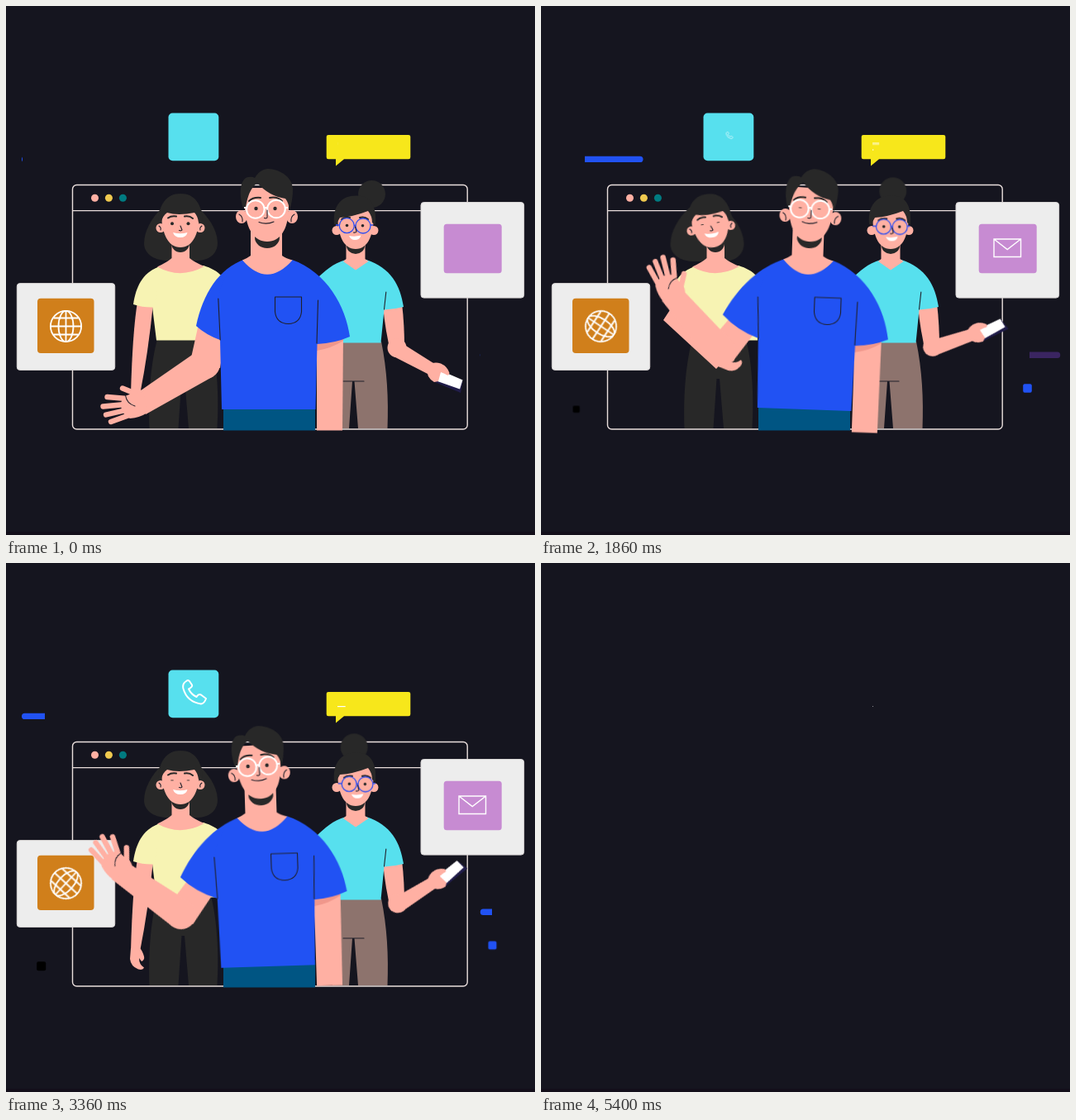
Recreate the animation shown at these times as an HTML page without scripts. Size 640 by 640 pixels, loop 5430 ms.

```html
<!DOCTYPE html>
<html lang="en">
<head>
<meta charset="utf-8">
<title>Team wave</title>
<style>
html, body { margin: 0; width: 100%; height: 100%; overflow: hidden; background: #15151f; }
svg { display: block; width: 100vw; height: 100vh; }
:root { --loop: 5.43s; --half: 2.715s; --third: 1.81s; --quarter: 1.3575s; --fifth: 1.086s; --sine: cubic-bezier(.37,0,.63,1); }

.skin { fill: #ffb0a3; }
.dark { fill: #282828; }
.blue { fill: #2152f3; }
.cyan { fill: #57e0ee; }
.cream { fill: #f7f3b3; }
.line { fill: none; stroke: #20202a; stroke-width: 1.1; stroke-linecap: round; stroke-linejoin: round; }
.brow { fill: none; stroke: #282828; stroke-width: 2; stroke-linecap: round; }
.white { fill: none; stroke: #fff; }

.scene { animation: cut var(--loop) step-end infinite; }
@keyframes cut { 0% { opacity: 1; } 99.43% { opacity: 0; } }

/* man */
.body, .head, .upper, .fore, .sleeve { animation: var(--loop) var(--sine) infinite; }
.body { transform-origin: 318px 510px; animation-name: sway; }
.head { transform-origin: 316px 295px; animation-name: nod; }
.upper { transform-origin: 252px 370px; animation-name: lift; }
.fore { transform-origin: 241px 433px; animation-name: wave; }
.sleeve { animation-name: sleeve; }
@keyframes sway {
  0%, 89.3%, 100% { transform: rotate(0deg); }
  16%, 34.3%, 52.9%, 71.3% { transform: rotate(2.05deg); }
  25%, 43.5%, 61.9% { transform: rotate(-1.8deg); }
}
@keyframes nod {
  0%, 89.3%, 100% { transform: rotate(0deg); }
  16%, 34.3%, 52.9%, 71.3% { transform: rotate(1.9deg); }
  25%, 43.5%, 61.9% { transform: rotate(-1.7deg); }
}
@keyframes lift {
  0%, 89.3%, 100% { transform: rotate(0deg); }
  16%, 71.3% { transform: rotate(26deg); }
}
@keyframes wave {
  0%, 89.3%, 100% { transform: rotate(0deg); }
  16%, 34.3%, 52.9%, 71.3% { transform: rotate(53deg); }
  25%, 43.5%, 61.9% { transform: rotate(43deg); }
}
@keyframes sleeve {
  0%, 89.3%, 100% { d: path("M288 307C258 317 238 348 230 387Q242 398 259 404L280 360Z"); }
  16%, 71.3% { d: path("M288 307C258 317 232 343 215 377Q234 396 259 404L280 360Z"); }
}
.blink { transform-origin: 316px 245px; animation: blink var(--half) linear infinite; }
@keyframes blink {
  0%, 59%, 73%, 100% { transform: scaleY(1); }
  61%, 69.5% { transform: scaleY(.25); }
}

/* woman on the left */
.tilt, .locks, .hang, .palm { animation: var(--half) var(--sine) infinite; }
.tilt { transform-origin: 211px 292px; animation-name: tilt; }
.locks { animation-name: locks; }
.hang { animation-name: hang; }
.palm { transform-origin: 156px 468px; animation-name: palm; }
@keyframes tilt {
  0%, 34%, 96%, 100% { transform: none; }
  56%, 73% { transform: translate(-2px, 0) rotate(-8deg); }
}
@keyframes locks {
  0%, 34%, 96%, 100% { transform: none; }
  56%, 73% { transform: translate(-10.5px, 1px); }
}
@keyframes hang {
  0%, 34%, 96%, 100% { d: path("M159 358Q153 395 151 470L162 470Q172 420 178 360Z"); }
  56%, 73% { d: path("M163 358Q159 363 148 380L212 439L224 426Q180 385 177 360Z"); }
}
@keyframes palm {
  0%, 34%, 96%, 100% { transform: none; }
  56%, 73% { transform: translate(62px, -36px) rotate(-72deg); }
}
.wink { transform-origin: 211px 263px; animation: wink var(--quarter) linear infinite; }
@keyframes wink {
  0%, 31%, 56%, 100% { transform: scaleY(1); }
  34%, 52% { transform: scaleY(.25); }
}

/* woman on the right */
.bun, .look, .phone { animation: var(--half) var(--sine) infinite; }
.bun { animation-name: bun; }
.look { animation-name: look; }
.phone { transform-origin: 472px 412px; animation-name: phone; }
@keyframes bun {
  0%, 7.4%, 83.2%, 100% { transform: none; }
  33.1%, 55.9% { transform: translate(-30px, -6.5px); }
}
@keyframes look {
  0%, 7.4%, 83.2%, 100% { transform: none; }
  33.1%, 55.9% { transform: translate(4px, 2.4px); }
}
@keyframes phone {
  0%, 7.4%, 83.2%, 100% { transform: rotate(0deg); }
  33.1%, 55.9% { transform: rotate(-87deg); }
}

/* floating parts */
.globe { transform-origin: 72.5px 387.5px; animation: spin var(--loop) linear infinite; }
@keyframes spin { to { transform: rotate(360deg); } }
.call { transform-origin: 228px 156.5px; animation: call var(--half) var(--sine) infinite; }
@keyframes call {
  0%, 81%, 100% { transform: scale(0); }
  22%, 47% { transform: scale(1); }
}
.mail { transform-origin: 564px 293px; animation: mail var(--half) var(--sine) infinite; }
@keyframes mail {
  0%, 5%, 96%, 100% { transform: scale(0); }
  22%, 75% { transform: scale(1); }
}
.row { transform-origin: 401px 170px; animation: var(--third) linear infinite; }
.r1 { animation-name: row1; }
.r2 { animation-name: row2; }
@keyframes row1 {
  0% { transform: scaleX(0); animation-timing-function: cubic-bezier(.2,.4,.6,1); }
  44% { transform: scaleX(1); animation-timing-function: cubic-bezier(.37,0,.63,1); }
  83%, 100% { transform: scaleX(0); }
}
@keyframes row2 {
  0%, 100% { transform: scaleX(0); }
  55%, 58% { transform: scaleX(1); }
}
.bar { fill: #2152f3; animation: bar var(--fifth) infinite, var(--fifth) linear infinite; }
.b1 { animation-name: bar, hue1; }
.b2 { animation-name: bar, hue2; }
@keyframes bar {
  0% { clip-path: inset(0 100% 0 0); animation-timing-function: cubic-bezier(.25,.3,.6,1); }
  50% { clip-path: inset(0 0 0 0); animation-timing-function: cubic-bezier(.6,0,.4,1); }
  100% { clip-path: inset(0 0 0 100%); }
}
@keyframes hue1 { 0%, 71.5% { fill: #2152f3; } 78%, 100% { fill: #3a2561; } }
@keyframes hue2 { 0%, 10% { fill: #2152f3; } 28%, 100% { fill: #3a2561; } }
.p1 { transform-origin: 588.5px 462.5px; animation: pulse1 var(--quarter) linear infinite; }
.p2 { transform-origin: 42.7px 487.8px; animation: pulse2 var(--quarter) linear infinite; }
@keyframes pulse1 {
  0%, 100% { transform: scale(0); }
  18%, 38% { transform: scale(1); }
  60% { transform: scale(.87); }
}
@keyframes pulse2 {
  0%, 8%, 100% { transform: scale(0); }
  47%, 62% { transform: scale(1); }
}
</style>
</head>
<body>
<svg viewBox="0 0 640 640">
<rect width="640" height="640" fill="#15151f"/>
<rect y="636" width="640" height="4" fill="#130f1a"/>
<rect x="401" y="173" width="1" height="1" fill="#8c8c90"/>

<g class="scene">
  <g fill="none" stroke="#eadfdd" stroke-width="1.4">
    <rect x="80.5" y="216.5" width="477.7" height="295.5" rx="5"/>
    <path d="M80.5 247.6H558"/>
  </g>
  <circle cx="107.5" cy="232.3" r="4.5" fill="#ffb0a3"/>
  <circle cx="124.4" cy="232.3" r="4.5" fill="#efc94f"/>
  <circle cx="141.4" cy="232.3" r="4.5" fill="#007a80"/>

  <g stroke="#d9d6d6" fill="#ededed">
    <rect x="13.3" y="335.6" width="118.4" height="104.8" rx="3.5"/>
    <rect x="502" y="237.5" width="124.6" height="115.6" rx="3.5"/>
  </g>
  <rect x="38" y="353.7" width="68.5" height="66.3" rx="4" fill="#d07f1b"/>
  <g class="globe white" stroke-width="1.8">
    <circle cx="72.5" cy="387.5" r="18.6"/>
    <ellipse cx="72.5" cy="387.5" rx="9" ry="18.6"/>
    <path d="M72.5 369V406M54 387.5H91M57.5 377.5H87.500M57.500 397.500H87.500"/>
  </g>
  <rect x="529.7" y="263.8" width="70" height="59.400" rx="3.500" fill="#c78bd2"/>
  <path class="mail white" stroke-width="1.4" d="M548 282H580.500V303.500H548ZL564.200 294.500L580.500 282"/>

  <rect class="cyan" x="196.500" y="129.500" width="60.800" height="57.700" rx="5"/>
  <path class="call white" stroke-width="2" stroke-linejoin="round" d="M218 143Q213 146 214.500 152Q219 168 236 170.500Q240 170 242 164L236 159.500Q233 158 230.500 162Q224 159 221 152.500Q226 150 225 147.500L222 143Q220 141 218 143Z"/>
  <path fill="#f7e71b" d="M390 156H487Q489.300 156 489.300 158V183Q489.300 185.300 487 185.300H409L399 193.500V185.300H390Q387.700 185.300 387.700 183V158Q387.700 156 390 156Z"/>
  <rect class="row r1" x="401" y="165.800" width="68.500" height="1.500" fill="#fff"/>
  <rect class="row r2" x="401" y="173" width="29" height="1.200" fill="#fff"/>

  <rect class="bar b1" x="19" y="181.700" width="104.500" height="7.400" rx="3.700"/>
  <rect class="bar b2" x="573.800" y="418.600" width="54.400" height="7.400" rx="3.500"/>
  <rect class="p1 blue" x="583.200" y="457.200" width="10.600" height="10.600" rx="2"/>
  <rect class="p2" x="37.200" y="482.300" width="11" height="11" rx="2" fill="#000"/>

  <!-- left -->
  <g>
    <path class="locks dark" d="M190 243C176 256 167 272 167 288C168 302 182 308 195 308H230C246 308 256 300 256 286C255 268 244 255 232 243Z"/>
    <path class="dark" d="M183 403C176 430 172 465 173.500 511H208.500L212.500 451H216L221 511H255.500C258 470 255 430 248 403Z"/>
    <path class="cream" d="M184 316C168 322 172 345 177 364L182 404.500H262V328C255 320 248 317 239 314Z"/>
    <path class="skin" d="M200.500 285V305Q195 310 183 315.500Q211 331 240 315Q228 310 222 305V285Z"/>
    <path class="hang skin" d="M159 358Q153 395 151 470L162 470Q172 420 178 360Z"/>
    <path class="palm skin" d="M151 466L150 479Q151 488 160 491.500Q166 493 167 489.500Q161 486 161 478L164 482Q168 480 167 476Q165 469 162 466Z"/>
    <path class="cream" d="M184 316C165 323 157 340 154 361Q166 365 179 364.500L186 330Z"/>
    <ellipse class="dark" cx="211" cy="287" rx="11" ry="11"/>
    <g class="tilt">
      <circle class="skin" cx="187" cy="268.500" r="5.500"/>
      <circle class="skin" cx="235" cy="268.500" r="5.500"/>
      <path class="skin" d="M188 245C187 275 196 292 211 292C226 292 235 275 234 245Z"/>
      <path class="dark" d="M184 261C185 240 194 227 211 227C229 227 237 240 238 261L233 262Q232 254 228 250Q208 254 195 250Q189 254 188 262Z"/>
      <path class="brow" d="M196 256.500Q200 253.500 206 254.500M216 254.500Q222 253.500 226 257"/>
      <g class="wink dark"><circle cx="201" cy="263.300" r="2"/><circle cx="220.500" cy="263.300" r="2"/></g>
      <path class="line" d="M211 266L213 271Q212 272.500 209.500 271.500"/>
      <path fill="#fff" d="M202 274Q211 276.500 219.500 274Q218 280 211 280Q204 280 202 274Z"/>
      <path class="line" stroke-width=".8" d="M185 266Q188 268 187 271M237 266Q234 268 235 271"/>
    </g>
  </g>

  <!-- right -->
  <g>
    <circle class="bun dark" cx="442.500" cy="227.500" r="16.500"/>
    <path fill="#8d736d" d="M400 406H454C461 440 463 475 461.500 511H426L421.500 454H419L415 511H395Z"/>
    <path class="line" d="M408 454H433"/>
    <path class="skin" d="M456 362L479 360Q482 385 482 412L466 421Q459 395 456 362Z"/>
    <g class="phone">
      <circle class="skin" cx="473" cy="413.500" r="11.500"/>
      <path class="skin" d="M479 408L517 432L512 446L469 424Z"/>
      <path fill="#201c49" d="M520 440L552.500 454L550 468L516.500 454Z"/>
      <path fill="#fff" d="M526 441L552.500 452.500L549 463.500L522 454Z"/>
      <path class="skin" d="M511 434Q518 430 526 432.500Q534 436 536.500 444Q536 449 531 445L526 443L523 454L518 455Q508 449 510 440Z"/>
    </g>
    <path class="cyan" d="M411 307C395 312 386 320 376 330V407.500H453.500L457.500 367.500Q470 367 481 364C477 338 466 317 436 307L423 317Z"/>
    <path class="skin" d="M411.500 285V306L408 309L423 319.500L438.500 309L434.500 306V285Z"/>
    <path class="line" d="M459.800 346L457.500 367"/>
    <ellipse class="dark" cx="423" cy="290" rx="11" ry="10"/>
    <circle class="skin" cx="400" cy="271.500" r="5.500"/>
    <circle class="skin" cx="445" cy="271.500" r="5.500"/>
    <path class="skin" d="M401 245C400 277 408 294 423 294C438 294 446 277 445 245Z"/>
    <path class="dark" d="M397 264C395 240 407 229 424 229.500C440 229 449 240 447 265L443 262Q443 254 438 248Q420 255 404 256Q401 260 400.500 265Z"/>
    <g class="look">
      <path class="brow" stroke-width="1.700" d="M406 258Q410 255 416 256M428 256Q434 254.500 438 258"/>
      <circle class="dark" cx="412.500" cy="265.500" r="1.800"/>
      <circle class="dark" cx="431.500" cy="265.800" r="1.800"/>
      <g fill="none" stroke="#2f4ff0" stroke-width="1.300">
        <circle cx="412.300" cy="265.700" r="9"/><circle cx="432" cy="266" r="9"/>
        <path d="M421 266Q422 264.500 423 266M403 265H399M441 265H444"/>
      </g>
      <path class="line" d="M422.500 267L424 273Q423 274.500 420.500 274"/>
      <path fill="#fff" d="M415 278Q422 279.500 429.500 277.500Q428 283 422 283Q417 283 415 278Z"/>
    </g>
  </g>

  <!-- middle -->
  <path fill="#005583" d="M263 480H374V513.500H263Z"/>
  <g class="body">
    <g class="upper skin">
      <path d="M238 362L270 372L259 438L223 430Z"/>
      <g class="fore">
        <circle cx="241" cy="433" r="18"/>
        <path d="M231 418L161 466.500L169 494L251 448Z"/>
        <path d="M166 465Q156 463 149 470Q139 472 139 484Q140 494 150 499Q162 498 171 492Z"/>
        <path fill="none" stroke="#ffb0a3" stroke-width="6.400" stroke-linecap="round" d="M157 469L141 462.500M146 475L122.500 473M144 482L117.500 484.500M145 489L121 494.500M149 495L127 503"/>
        <path class="line" d="M144.500 471Q146 481 156 484"/>
      </g>
    </g>
    <path class="skin" d="M376 400L408 395L407 513.500H376Z"/>
    <path fill="#f0978b" d="M376 406L408 400V405Q394 414 376 417Z"/>
    <path class="sleeve blue" d="M288 307C258 317 238 348 230 387Q242 398 259 404L280 360Z"/>
    <path class="blue" d="M287 307C270 315 260 335 257 353L259 404L261 488H374.500L376.500 409Q398 408 416 400C411 363 388 322 346 307Z"/>
    <path class="line" d="M256.800 354L259.200 404M377.500 356L376 408M325.500 352H357.500V370Q356 384 341.500 384.500Q327 384 325.500 370Z"/>
    <path class="skin" d="M296 270V302Q292 305 286 307.500Q316 342 346.500 307.500Q338 305 334 302V270Z"/>
    <g class="head">
      <ellipse class="dark" cx="316" cy="280" rx="15" ry="13"/>
      <ellipse class="skin" cx="285" cy="255" rx="7" ry="8"/>
      <ellipse class="skin" cx="346" cy="255" rx="7" ry="8"/>
      <path class="skin" d="M289 220V246C291 270 300 285 316 285C332 285 341 270 342 246V220Z"/>
      <path class="dark" d="M287 245C282 230 282 209 293 207Q298 206 301 208C306 199 313 197 318 197C333 198 347 208 347 222Q347 235 343 247Q342 238 338 233Q318 230 304 214Q293 222 290 244Z"/>
      <path class="brow" stroke-width="2.500" d="M294 236Q299 231 308 232M319 232Q328 230 334 236"/>
      <g class="blink dark"><circle cx="302.500" cy="245" r="2.200"/><circle cx="325.500" cy="245" r="2.200"/></g>
      <g class="white" stroke-width="2">
        <circle cx="301.800" cy="246" r="10.800"/><circle cx="327" cy="245.500" r="10.800"/>
        <path d="M312.500 245Q314.500 243 316.500 245M291 244H288M338 244H341"/>
      </g>
      <path class="line" d="M316 247V256Q315 257.500 312.500 256.500M306 261.500Q315 265 324 261M282 252Q287 255 286 261M349 252Q344 255 345 261"/>
    </g>
  </g>
</g>
</svg>
</body>
</html>
```
